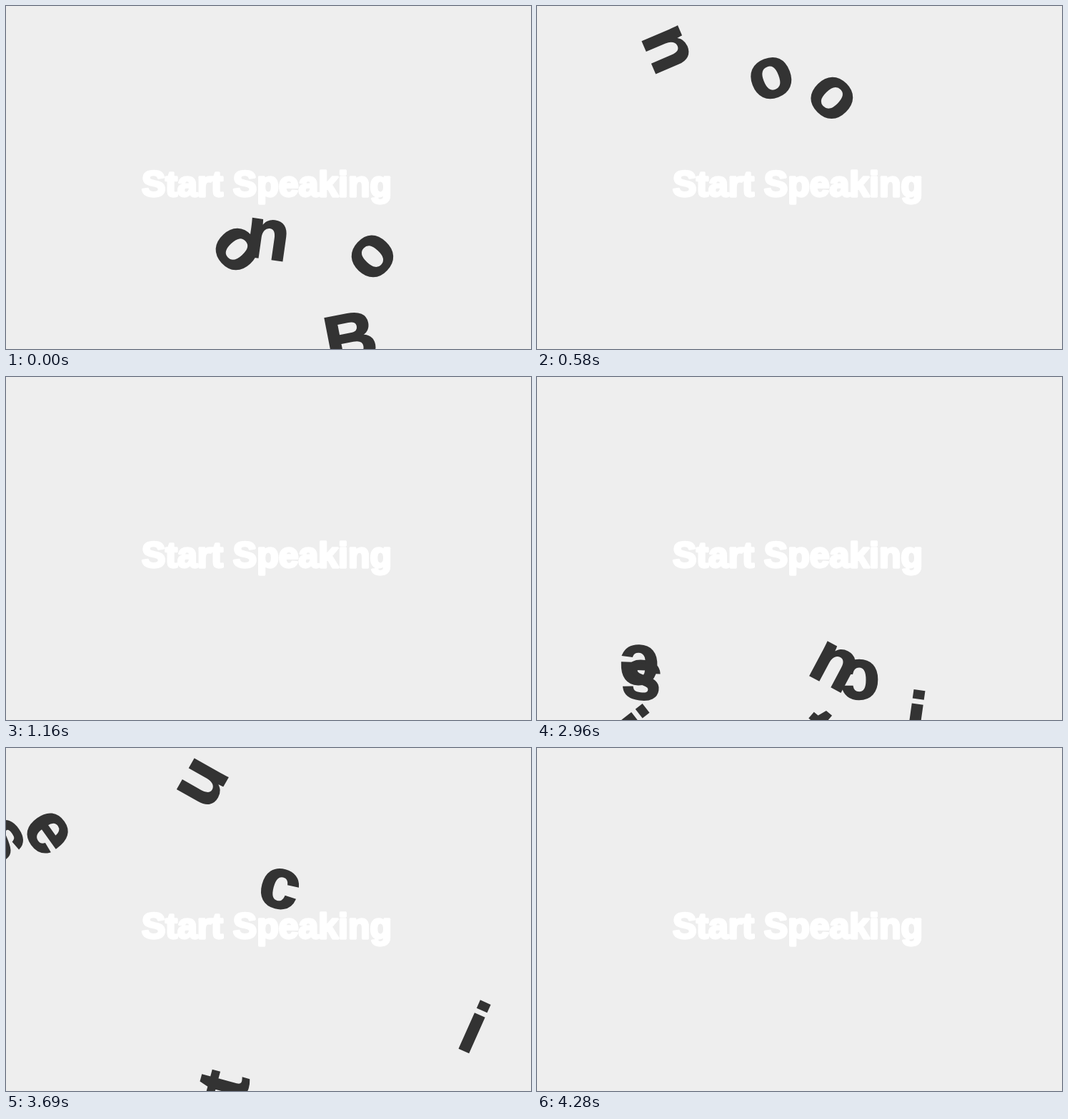
Write an HTML page with a canvas that moves like this. It is 735 by 481 pixels and loops after 5.22 s.

```html
<!DOCTYPE html>
<html lang="en">
<head>
<meta charset="utf-8">
<title>Start Speaking</title>
<style>
html, body { margin: 0; width: 100%; height: 100%; overflow: hidden; background: #eee; }
canvas { display: block; }
</style>
</head>
<body>
<canvas id="stage" width="735" height="481"></canvas>
<script>
const ctx = document.getElementById('stage').getContext('2d');
const FONT = '"Liberation Sans", Arial, Helvetica, sans-serif';
const LOOP = 5220;
const STEP = 145; // ms between poses; speeds below are per pose

// A thrown letter: launch point, speed, tilt and spin in degrees.
const toss = (glyph, x, y, vx, vy, tilt, spin, pull) =>
  ({ glyph, x, y, vx, vy, tilt, spin, pull });

// A letter that only peeks over the lower edge.
const hop = (glyph, x, y, tilt) => toss(glyph, x, y, 0, -111, tilt, 0);

const bursts = [
  {
    from: 0, to: 1160, gravity: 27.5,
    letters: [
      toss('B', 483, 466, 1, -80, -11, -8),
      toss('o', 323, 341, 1.2, -170, 47, -17),
      toss('o', 513, 351, -25, -165.5, -47, -22),
      toss('n', 366, 327, -46, -176.5, 8, 14.7)
    ]
  },
  {
    from: 2960, to: 4280, gravity: 23.3,
    letters: [
      toss('s', 147, 425, -30.5, -175.6, 8, 9.5),
      toss('c', 452, 424, -13.8, -152.3, 180, 111, 21.4),
      toss('i', 123, 487, -35, -126.6, 52, 35.3),
      toss('e', 143, 404, -17, -173.5, 182, 118.5),
      toss('n', 416, 406, -28, -178.3, 28, 18.3, 21.4),
      toss('t', 387, 497, -16.3, -121.6, 40, -23),
      toss('i', 530, 476, 25.2, -133.6, 8, 3.2),
      hop('s', 306, 536, -4),
      hop('s', 217, 597, 90),
      hop('e', 266, 599, 25)
    ]
  }
];

function setPen(size, color, weight) {
  ctx.font = `bold ${size}px ${FONT}`;
  ctx.fillStyle = ctx.strokeStyle = color;
  ctx.lineWidth = weight;
}

function heavyText(text, x, y) {
  ctx.strokeText(text, x, y);
  ctx.fillText(text, x, y);
}

// Ballistic flight, turning about the middle of the glyph's ink.
function drawLetter(l, t, gravity) {
  const m = ctx.measureText(l.glyph);
  ctx.save();
  ctx.translate(l.x + l.vx * t, l.y + l.vy * t + (l.pull || gravity) * t * t);
  ctx.rotate((l.tilt + l.spin * t) * Math.PI / 180);
  heavyText(l.glyph,
    (m.actualBoundingBoxLeft - m.actualBoundingBoxRight) / 2,
    (m.actualBoundingBoxAscent - m.actualBoundingBoxDescent) / 2);
  ctx.restore();
}

function draw(ms) {
  ctx.fillStyle = '#eee';
  ctx.fillRect(0, 0, 735, 481);
  ctx.lineJoin = 'round';
  setPen(50, '#fff', 3.4);
  heavyText('Start Speaking', 190, 267);

  ctx.lineJoin = 'miter';
  ctx.miterLimit = 2;
  setPen(100, '#333', 2.4);
  for (const b of bursts) {
    if (ms < b.from || ms >= b.to) continue;
    const t = Math.floor((ms - b.from) / STEP);
    for (const l of b.letters) drawLetter(l, t, b.gravity);
  }
}

ctx.fontKerning = 'none';
const start = performance.now();
function tick() {
  draw((performance.now() - start) % LOOP);
  requestAnimationFrame(tick);
}
tick();
</script>
</body>
</html>
```
